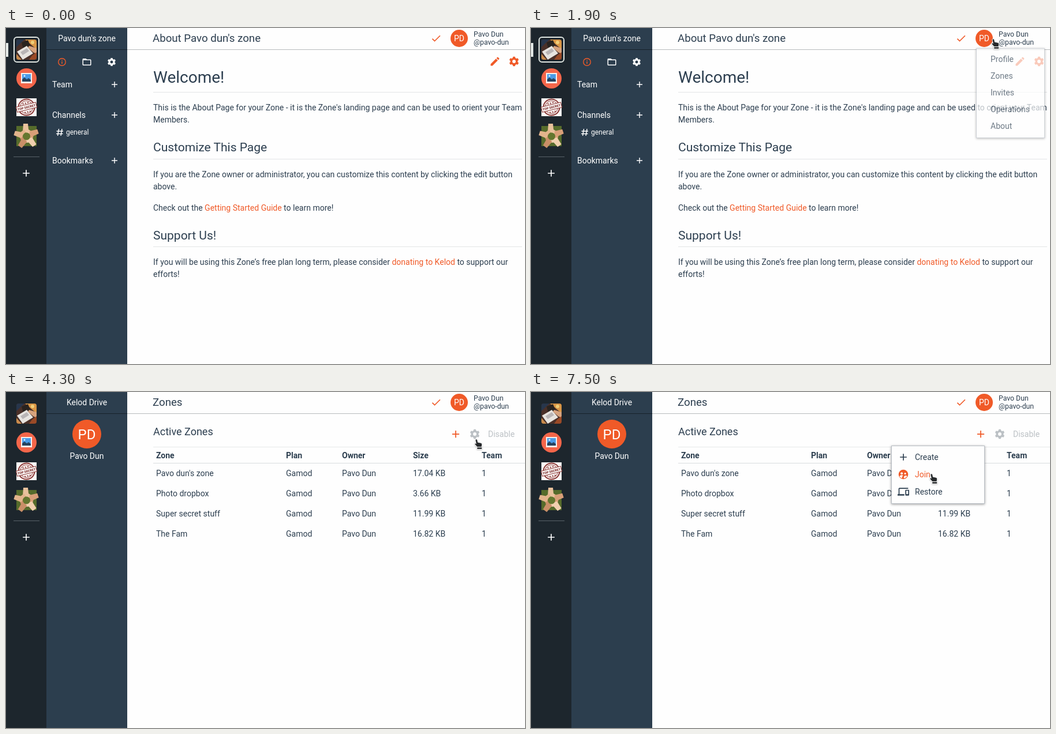
These frames come from a looping animation (899x583 px, 8000 ms). An HTML page:

```html
<!DOCTYPE html>
<html lang="en">
<head>
<meta charset="utf-8">
<title>Zones</title>
<style>
  html, body { margin: 0; width: 100%; height: 100%; overflow: hidden; background: #fefefe; }
  svg { display: block; width: 899px; height: 583px; font: 14px Roboto, sans-serif; color: #2c3e4f; }
  text { fill: currentColor; white-space: pre; }
  .hot { color: #f05a28; }
  .light { color: #fff; }
  .off { color: #bcc1c5; }
  .mid { text-anchor: middle; }
  .menu > rect { fill: #fefefe; stroke: #b9bfc6; filter: drop-shadow(0 1px 2px #0006); }
</style>
</head>
<body>
<svg id="stage" viewBox="0 0 899 583"></svg>
<script>
const LOOP = 8000;
const USER = 'Pavo Dun', INITIALS = 'PD', ZONE = "Pavo dun's zone";

const PATHS = {
  plus: 'M19 13h-6v6h-2v-6H5v-2h6V5h2v6h6v2z',
  check: 'M9 16.17L4.83 12l-1.42 1.41L9 19 21 7l-1.41-1.41z',
  folder: 'M20 6h-8l-2-2H4c-1.1 0-2 .9-2 2v12c0 1.1.9 2 2 2h16c1.1 0 2-.9 2-2V8c0-1.1-.9-2-2-2zm0 12H4V8h16v10z',
  edit: 'M3 17.25V21h3.75L17.81 9.94l-3.75-3.75zM20.71 7.04a1 1 0 0 0 0-1.41l-2.34-2.34a1 1 0 0 0-1.41 0l-1.83 1.83 3.75 3.75z',
  devices: 'M4 6h18V4H4c-1.1 0-2 .9-2 2v11H0v3h14v-3H4V6zm19 2h-6c-.55 0-1 .45-1 1v10c0 .55.45 1 1 1h6c.55 0 1-.45 1-1V9c0-.55-.45-1-1-1zm-1 9h-4v-7h4v7z'
};

const text = (x, y, s, size = 14, attrs = '') =>
  `<text x="${x}" y="${y}" font-size="${size}" ${attrs}>${s}</text>`;
const rect = (x, y, w, h, fill, attrs = '') =>
  `<rect x="${x}" y="${y}" width="${w}" height="${h}" fill="${fill}" ${attrs}/>`;
const circle = (x, y, r, fill, attrs = '') =>
  `<circle cx="${x}" cy="${y}" r="${r}" fill="${fill}" ${attrs}/>`;
const path = (d, fill, attrs = '') => `<path d="${d}" fill="${fill}" ${attrs}/>`;
const icon = (name, x, y, size, attrs = '') =>
  `<g ${attrs}><path transform="translate(${x} ${y}) scale(${size / 24}) translate(-12 -12)" fill="currentColor" d="${PATHS[name]}"/></g>`;
const gear = (x, y, size, attrs = '') => {
  const teeth = [0, 60, 120, 180, 240, 300].map(a =>
    path('M-3-6.5L-2.1-10H2.1L3-6.5z', 'currentColor', `transform="rotate(${a})"`)).join('');
  return `<g ${attrs}><g transform="translate(${x} ${y}) scale(${size / 24})">${teeth}` +
    circle(0, 0, 5.6, 'none', 'stroke="currentColor" stroke-width="4.2"') + '</g></g>';
};
const people = (x, y) => `<g transform="translate(${x} ${y})">` + circle(0, 0, 8.3, 'currentColor') +
  circle(-2.9, -1.8, 2, '#fefefe') + circle(3.1, -1.4, 1.6, '#fefefe') +
  path('M-6.6 3.4C-5.4.9-1.2.9-.5 2.3-2 3.2-2.3 4.6-2.2 6.4-4.2 5.9-5.7 5-6.6 3.4zM1 6.7C-.2 2.4 4.6.6 6.5 3 5.4 5.2 3.4 6.5 1 6.7z', '#fefefe') + '</g>';
const avatar = (x, y, r, size) => circle(x, y, r, '#f05a28') +
  text(x, y + size * .36, INITIALS, size, 'class="light mid"');

// Sidebar thumbnails, each on a 35 px tile
const tile = (y, body, r = 4) =>
  `<svg x="18" y="${y}" width="35" height="35" style="clip-path:inset(0 round ${r}px)">${body}</svg>`;
const desk = rect(0, 0, 35, 35, '#4a3029') +
  path('M0 0H14L0 13z', '#27364c') + path('M15 0H35V17z', '#d99646') +
  path('M9 5L20 1 26 15 13 21z', '#29231f') + path('M1 21L18 11 29 24 11 35z', '#e7e4e0') +
  path('M7 22L18 15 22 20 11 27z', '#b9b5b6') +
  path('M35 15L22 11 20 14 29 22 35 25z', '#d6a27e') + path('M27 28L35 22V35H22z', '#9a4a27') +
  path('M0 25L9 35H0z', '#c98b4c') + circle(28, 5, 3, '#f0cf7a');
const picture = rect(0, 0, 35, 35, '#f4664a') + rect(8, 8, 19, 18, '#f5f2ee') +
  rect(10, 10, 15, 13, '#4a9be8') + circle(14, 13, 1.6, '#d9efff') +
  path('M10 23V19L14 16 18 19 21 17 25 20V23z', '#26435f');
const stamp = rect(0, 2, 35, 31, '#fbf8f6') +
  '<g transform="rotate(-14 17.5 17.5)">' +
  circle(17.5, 17.5, 14, 'none', 'stroke="#8c3a38" stroke-width="2"') +
  circle(17.5, 17.5, 11, 'none', 'stroke="#a45a57" stroke-width="1"') +
  text(17.5, 12, '★★★', 5, 'class="mid" style="color:#8c3a38"') +
  text(17.5, 27.5, '★★★', 5, 'class="mid" style="color:#8c3a38"') +
  rect(0, 13, 35, 9, '#fbf8f6', 'stroke="#8c3a38"') +
  text(17.5, 19.6, 'TOP SECRET', 5.4, 'class="mid" font-weight="900" style="color:#7d2d2c"') + '</g>';
const hands = rect(0, 0, 35, 35, '#566b2b') +
  [0, 72, 144, 216, 288].map((a, i) => `<g transform="rotate(${a} 17.5 17.5)">` +
    path('M12-4L20-4 21 6 27 10 24 14 11 10z', ['#e9c19c', '#d99f78', '#f0cfae', '#c98f68', '#e3b48c'][i]) + '</g>').join('') +
  circle(17.5, 18, 6.5, '#64772f');

const rail = rect(0, 0, 70, 583, '#1d262d') + rect(70, 0, 140, 583, '#2c3e4e') +
  rect(70, 37, 140, 1, '#17212a') + tile(20, desk) + tile(70, picture, 18) + tile(120, stamp) + tile(170, hands) +
  rect(13, 223, 45, 1, '#59636a') + icon('plus', 35, 252, 20, 'class="light"');

const header = rect(210, 37, 689, 1, '#b8bbbd') + icon('check', 745, 18, 20, 'class="hot"') +
  avatar(785, 18, 15, 14) + text(810, 15, USER, 12.25) + text(810, 29, '@pavo-dun', 12.25);

const section = (y, s, size, line) => text(255, y, s, size) + rect(255, line, 639, 1, '#e3e5e6');
const link = s => `<tspan fill="#f05a28">${s}</tspan>`;

const aboutPage = rect(0, 26, 4, 24, '#e3e8e6') +
  '<rect x="14" y="16" width="43" height="43" rx="5" fill="none" stroke="#dfe6e2" stroke-width="2"/>' +
  '<g class="light">' + text(140, 23, ZONE, 14, 'class="mid"') +
  icon('folder', 140, 59, 18) + gear(183, 59, 17) +
  [['Team', 98], ['Channels', 151], ['Bookmarks', 230]].map(([s, y]) =>
    text(80, y + 5, s) + icon('plus', 188, y, 17)).join('') +
  path('M91.5 175L89.5 187M97 175L95 187M87.5 179H99M87 183.5H98.5', 'none', 'stroke="#fff" stroke-width="1.5"') +
  text(104, 185, 'general', 12) + '</g>' +
  circle(97, 59, 6.3, 'none', 'stroke="#f05a28" stroke-width="1.4"') + rect(96.3, 58, 1.4, 4.2, '#f05a28') + rect(96.3, 55.4, 1.4, 1.5, '#f05a28') +
  text(254, 24, `About ${ZONE}`, 18.67) +
  icon('edit', 847, 58, 20, 'class="hot"') + gear(880, 58, 20, 'class="hot"') +
  section(95, 'Welcome!', 28, 111) +
  text(255, 143, "This is the About Page for your Zone - it is the Zone's landing page and can be used to orient your Team") +
  text(255, 164, 'Members.') +
  section(214, 'Customize This Page', 21, 227) +
  text(255, 259, 'If you are the Zone owner or administrator, you can customize this content by clicking the edit button') +
  text(255, 280, 'above.') +
  text(255, 317, `Check out the ${link('Getting Started Guide')} to learn more!`) +
  section(367, 'Support Us!', 21, 379) +
  text(255, 411, `If you will be using this Zone’s free plan long term, please consider ${link('donating to Kelod')} to support our`) +
  text(255, 432, 'efforts!') +
  '<g id="userMenu" class="menu">' + rect(771.5, 35.5, 118, 155, '') +
  ['Profile', 'Zones', 'Invites', 'Operations', 'About'].map((s, i) =>
    text(796, 59 + 29 * i, s, 14, `id="item${s}"`)).join('') + '</g>';

const COLUMNS = [260, 485, 582, 705, 824];
const row = (y, cells, attrs) => cells.map((s, i) => text(COLUMNS[i], y, s, 14, attrs)).join('');

const zonesPage = '<g class="light mid">' + text(140, 23, 'Kelod Drive') + avatar(140, 73, 25, 24) + text(140, 116, USER) + '</g>' +
  text(254, 24, 'Zones', 18.67) + text(255, 75, 'Active Zones', 18) +
  rect(766, 60, 26, 26, '#f05a28', 'rx="4" id="addBack"') + icon('plus', 779, 73, 21, 'id="addIcon"') +
  gear(812, 73, 20, 'class="off"') + text(835, 78, 'Disable', 14, 'class="off"') +
  rect(255, 95, 644, 1, '#e6e8e9') + rect(255, 123, 644, 1, '#d9dcde') +
  row(115, ['Zone', 'Plan', 'Owner', 'Size', 'Team'], 'font-weight="700"') +
  [[ZONE, '17.04'], ['Photo dropbox', '3.66'], ['Super secret stuff', '11.99'], ['The Fam', '16.82']].map(([name, size], i) =>
    row(146 + 35 * i, [name, 'Gamod', USER, `${size} KB`, '1'])).join('') +
  '<g id="addMenu" class="menu">' + rect(624.5, 93.5, 161, 100, '') +
  '<g id="itemCreate">' + icon('plus', 645, 113, 20) + text(665, 118, 'Create') + '</g>' +
  '<g id="itemJoin">' + people(645, 143) + text(665, 148, 'Join') + '</g>' +
  icon('devices', 645, 173, 20) + text(665, 178, 'Restore') + '</g>';

const outline = 'stroke="#fff" stroke-width="1.8" stroke-linejoin="round" paint-order="stroke"';
const cursor = '<g id="cursor" style="filter:drop-shadow(0 1px 1px #0004)">' +
  path('M.6 .8V15.4L4 12.3 6.2 17.6 8.6 16.6 6.4 11.4H11z', '#26292b', `id="arrow" ${outline}`) +
  '<g id="hand" transform="translate(-4 0)">' +
  path('M2.4 2.6Q2.4 1 4 1.2 5 1.4 5.2 2.8L6 6.6 11.6 7.8Q13.4 8.3 13.2 10L12.6 14.2H5.4L1.2 9.6Q.8 8.2 2.4 8.4L3.8 9.2z', '#26292b', outline) +
  rect(5.2, 15.2, 8, 2.6, '#26292b', outline) + '</g></g>';

document.getElementById('stage').innerHTML = rect(0, 0, 899, 583, '#fefefe') + rail + header +
  `<g id="aboutPage">${aboutPage}</g><g id="zonesPage">${zonesPage}</g>` + cursor;

// steps: [time, value, easing]
function play(id, prop, steps, easing = 'step-end') {
  const all = [...steps, [LOOP, steps.at(-1)[1]]];
  document.getElementById(id).animate(
    all.map(([t, v, e]) => ({ offset: t / LOOP, [prop]: v, easing: e || easing })),
    { duration: LOOP, iterations: Infinity });
}
// Alternates between two values, starting with the first
const flip = (id, prop, a, b, ...times) =>
  play(id, prop, [[0, a], ...times.map((t, i) => [t, i % 2 ? a : b])]);
const hover = (id, ...times) => flip(id, 'color', '#2c3e4f', '#f05a28', ...times);

flip('aboutPage', 'opacity', 1, 0, 4300);
flip('zonesPage', 'opacity', 0, 1, 4300);
play('userMenu', 'opacity', [[0, 0], [1800, 0, 'cubic-bezier(0,0,.2,1)'], [2100, 1]]);
hover('itemProfile', 2490, 2745);
hover('itemZones', 2745);
flip('addBack', 'opacity', 0, 1, 5000, 6910);
flip('addIcon', 'color', '#f05a28', '#fff', 5000, 6910);
flip('addMenu', 'opacity', 0, 1, 6200);
hover('itemCreate', 7020, 7300);
hover('itemJoin', 7300);
const handTimes = [1430, 4780, 5000, 6910, 7020];
flip('arrow', 'opacity', 1, 0, ...handTimes);
flip('hand', 'opacity', 0, 1, ...handTimes);
flip('cursor', 'opacity', 0, 1, 170);

// Pointer stops: time, x, y
const track = [
  [0, 13, 0], [170, 13, 0], [570, 255, 264], [985, 642, 118], [1570, 801, 18],
  [2250, 801, 18], [2600, 806, 52], [2900, 815, 81], [4770, 815, 81],
  [5170, 779, 71], [6770, 779, 71], [7000, 743, 96], [7500, 694, 141], [LOOP, 694, 141]
];
const slope = (i, k) => (track[i + 1][k] - track[i][k]) / (track[i + 1][0] - track[i][0]);
function tangent(i, k) {
  if (i === 0 || i === track.length - 1) return 0;
  const a = slope(i - 1, k), b = slope(i, k);
  return a * b > 0 ? 2 * a * b / (a + b) : 0;
}
// Monotone cubic between stops i and i + 1
function glide(i, k, u) {
  const d = track[i + 1][0] - track[i][0], v = 1 - u;
  return track[i][k] * v * v * (1 + 2 * u) + track[i + 1][k] * u * u * (3 - 2 * u) +
    d * u * v * (tangent(i, k) * v - tangent(i + 1, k) * u);
}
const moves = [];
for (let i = 0; i < track.length - 1; i++) {
  const start = track[i][0], d = track[i + 1][0] - start, n = Math.ceil(d / 30);
  for (let j = 0; j < n; j++) {
    const u = j / n;
    moves.push([start + d * u, `translate(${glide(i, 1, u)}px, ${glide(i, 2, u)}px)`]);
  }
}
play('cursor', 'transform', moves, 'linear');
</script>
</body>
</html>
```
